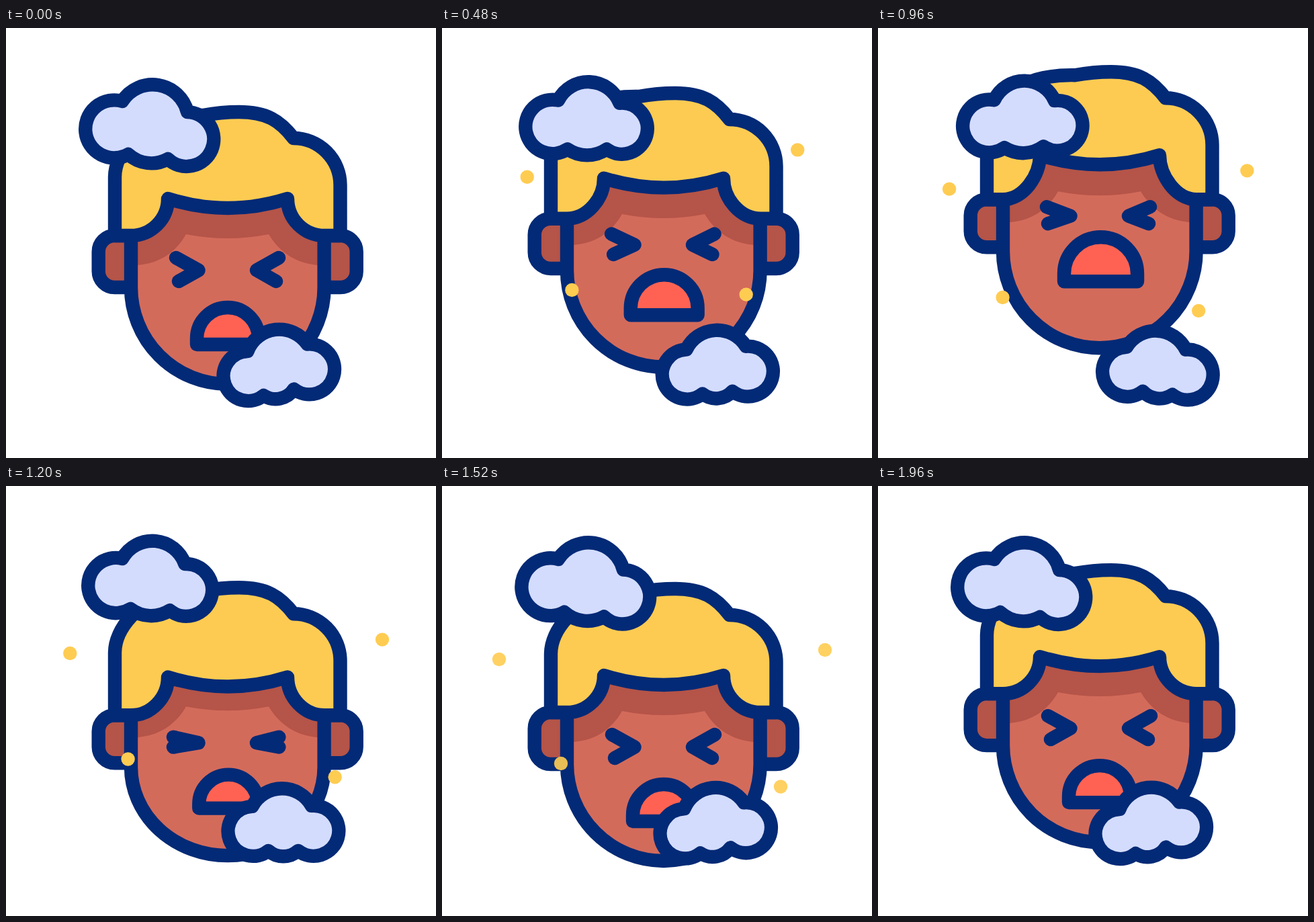
These frames come from a looping animation (640 px wide and 640 px high, 2 s). An HTML page:

```html
<!DOCTYPE html>
<html lang="en">
<head>
<meta charset="utf-8">
<title>Sneeze</title>
<style>
  html, body { margin: 0; width: 100%; height: 100%; overflow: hidden; background: #fff; }
  svg { display: block; width: 100vw; height: 100vh; }
  .line { stroke: #032a76; stroke-width: 20.4; stroke-linecap: round; stroke-linejoin: round; }
  .skin { fill: #d36b5b; }
  .shade { fill: #b55448; }
  .hair { fill: #fdcb52; }
  .mouth { fill: #ff6252; }
  .cloud { fill: #d3dcfd; }
  .none { fill: none; }
</style>
</head>
<body>
<svg viewBox="0 0 640 640">
  <g id="head">
    <rect id="earL" class="line shade" x="137.7" y="309" width="80" rx="24"/>
    <rect id="earR" class="line shade" x="441.7" y="309" width="80" rx="24"/>
    <path id="skin" class="skin"/>
    <path id="shade" class="shade" d="M186 230V353H196C228 350 252 335 268 307Q330 319 391 307C408 335 432 350 464 353H473V230Z"/>
    <path id="jaw" class="line none"/>
    <path id="hair" class="line hair"/>
    <path id="eyes" class="line none"/>
    <path id="mouth" class="line mouth"/>
  </g>
  <g id="dots" fill="#ffcc52"></g>
  <path id="puffTop" class="line cloud"/>
  <path id="puffLow" class="line cloud"/>
</svg>
<script>
const LOOP = 2000, STEP = 40;
const $ = id => document.getElementById(id);
const set = (id, name, value) => $(id).setAttribute(name, value);
const mix = (a, b, k) => a + (b - a) * k;
const smooth = k => (1 - Math.cos(Math.PI * k)) / 2;
const outSoft = k => 1 - Math.pow(1 - k, 2.23);

// keys: [time, value, easing towards this key]
function track(t, keys) {
  if (t <= keys[0][0]) return keys[0][1];
  for (let i = 1; i < keys.length; i++) {
    const [t0, v0] = keys[i - 1], [t1, v1, ease = smooth] = keys[i];
    if (t <= t1) return mix(v0, v1, ease((t - t0) / (t1 - t0)));
  }
  return keys[keys.length - 1][1];
}

const lift = t => track(t, [[0, 0], [1000, -54], [1040, -54], [1290, 67], [2000, 0, outSoft]]);

// A value that goes from rest to inhale, snaps to sneeze and relaxes
const pose = (t, rest, inhale, sneeze) =>
  track(t, [[100, rest], [900, inhale], [1040, inhale], [1290, sneeze], [1500, rest]]);

// Four corners of a cloud, each followed by the radius of the arc that leaves it
const puffs = {
  puffTop: {
    rest: [182, 188, 43, 173, 109, 53.5, 270, 125, 40.5, 241, 195, 51],
    move: [189, 177, 39, 173, 107, 48.8, 262, 106, 37, 247, 174, 52],
    keys: [[80, 0], [740, 1.05], [1600, 0]]
  },
  puffLow: {
    rest: [383.5, 547, 37, 359.5, 481, 50.7, 448.5, 470.5, 37.5, 428.5, 537.5, 32.6],
    move: [394.5, 540.5, 37, 370.5, 474.5, 50.3, 458.5, 479, 37.5, 438.5, 546, 34],
    keys: [[200, 0], [860, 1], [1680, 0]]
  }
};

function puffPath({ rest, move, keys }, t) {
  const k = track(t, keys);
  const v = rest.map((a, i) => mix(a, move[i], k));
  let d = `M${v[0]} ${v[1]}`;
  for (let i = 0; i < 4; i++) {
    const j = (i + 1) % 4 * 3, r = v[i * 3 + 2];
    d += `A${r} ${r} 0 ${i % 2 ? 0 : 1} 1 ${v[j]} ${v[j + 1]}`;
  }
  return d + 'Z';
}

const dots = [
  { from: [131, 218], to: [85, 258], span: 790 },
  { from: [525, 175], to: [570, 244], span: 790 },
  { from: [195.5, 387], to: [177, 413], span: 1120 },
  { from: [446, 390], to: [504, 447.5], span: 1120 }
];
for (const dot of dots) {
  dot.el = document.createElementNS('http://www.w3.org/2000/svg', 'circle');
  dot.el.setAttribute('r', 10.2);
  $('dots').append(dot.el);
}

function drawDots(t) {
  const fade = track(t, [[160, 0], [320, 1], [1480, 1], [1680, 0]]);
  for (const { el, from, to, span } of dots) {
    const travel = x => x - x ** 3 / (3 * span * span);
    const k = (travel(t - 920) / travel(600) + 1) / 2;
    el.setAttribute('cx', mix(from[0], to[0], k));
    el.setAttribute('cy', mix(from[1], to[1], k));
    el.setAttribute('opacity', fade);
  }
}

function drawHead(t) {
  set('head', 'transform', `translate(0 ${lift(t)})`);

  const squash = pose(t, 0, -6, -6);
  set('earL', 'height', 77 + squash);
  set('earR', 'height', 77 + squash);

  const jaw = 144 + track(t, [[1040, 0], [1290, -17], [1500, 0]]);
  const face = `M186 230V386A143.8 ${jaw} 0 0 0 473.6 386V230Z`;
  set('skin', 'd', face);
  set('jaw', 'd', face);
  set('shade', 'transform', `translate(0 ${pose(t, 0, -10, -11.5)})`);

  const bang = 254 + pose(t, 0, -11, 2), y = n => n + squash;
  set('hair', 'd', `M162 309V${y(222)}C162 ${y(186)} 198 ${y(144)} 246 ${y(134)}
    Q268 ${y(129.5)} 293 ${y(130)}Q320 ${y(125)} 347 ${y(125)}C388 ${y(125)} 408 ${y(138)} 428 ${y(164)}
    A69.5 70 0 0 1 497.5 ${y(234)}V309H474C443.6 309 419 ${bang + 30.4} 419 ${bang}
    Q330 ${bang + 28} 241 ${bang}C241 ${bang + 30.4} 216.4 309 186 309Z`);

  const gap = pose(t, 17.5, 12.5, 5.4), eyeY = 359.5 + pose(t, 0, -27, -4);
  const upX = 249 + (gap - 7.5) * 0.4, lowX = 249 + (gap - 7.5) * 0.8;
  const squeeze = pose(t, 0, -3, -4);
  const eye = (up, tip, low) => `M${up} ${eyeY - gap}L${tip} ${eyeY + 1}L${low} ${eyeY + gap}`;
  set('eyes', 'd', eye(upX, 286.5, lowX) + eye(659 - upX + squeeze, 373, 659 - lowX + squeeze));

  const mid = pose(t, 330, 331.5, 331), half = pose(t, 46, 54.5, 39.6);
  const top = 416 + pose(t, 0, -51, -5.6), base = 471 + pose(t, 0, -40, -17);
  set('mouth', 'd', `M${mid - half} ${base}V${top + half}A${half} ${half} 0 0 1 ${mid + half} ${top + half}V${base}Z`);
}

const start = performance.now();
function frame() {
  const t = Math.floor((performance.now() - start) % LOOP / STEP) * STEP;
  drawHead(t);
  drawDots(t);
  for (const id in puffs) set(id, 'd', puffPath(puffs[id], t));
  requestAnimationFrame(frame);
}
frame();
</script>
</body>
</html>
```
